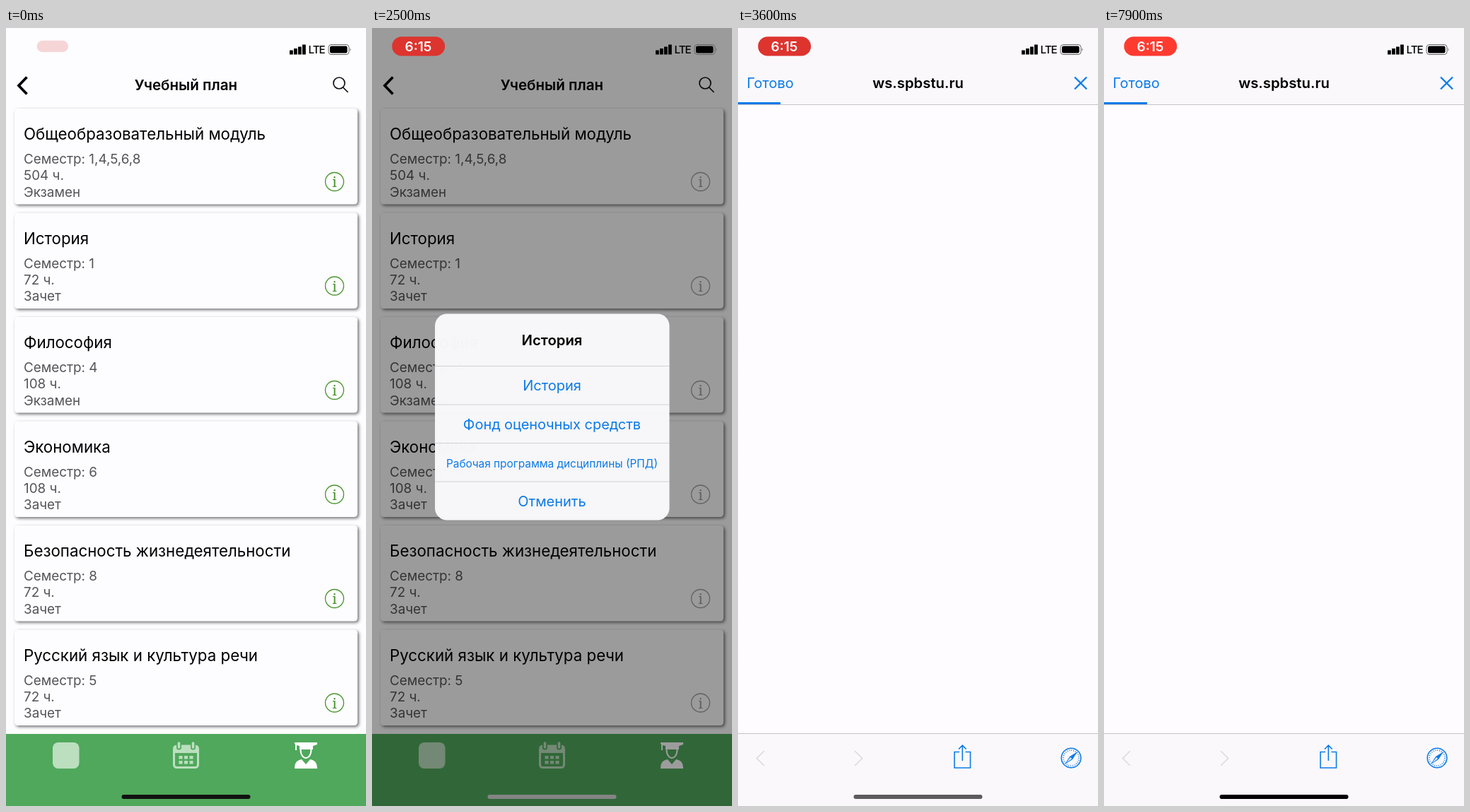
Write an HTML page that moves like this. It is 509 px wide and 1101 px high and loops after 8000 ms.

```html
<!DOCTYPE html>
<html lang="ru">
<head>
<meta charset="utf-8">
<style>
  html, body { margin: 0; width: 100%; height: 100%; overflow: hidden; background: #fdfcfe; }
  svg { display: block; width: 509px; height: 1101px; font-family: Inter, sans-serif; }
  .title { font-size: 22.3px; }
  .sub { font-size: 18.85px; fill: #555456; }
  .bold { font-size: 20.3px; font-weight: 600; }
  .btn { font-size: 20px; }
  .mid { text-anchor: middle; }
  .blue { fill: #0c7ae8; }
  .line { fill: none; stroke: #0c7ae8; stroke-width: 1.6; }
  .card { fill: #fdfcfe; filter: drop-shadow(2px 2px 2px rgba(0, 0, 0, .55)); }
</style>
</head>
<body>
<svg viewBox="0 0 509 1101">
  <g id="list">
    <rect width="800" height="1101" fill="#fdfcfe"/>
    <path d="M29.500 69.500L18 81.500L29.500 93.500" fill="none" stroke="#000" stroke-width="3.700"/>
    <text class="bold mid" x="254.500" y="88" style="font-size:20.6px">Учебный план</text>
    <g fill="none" stroke="#111" stroke-width="1.700"><circle cx="471" cy="78" r="8"/><path d="M476.500 84L483.500 91"/></g>
    <g id="cards"></g>
    <rect id="highlight" y="256" width="509" height="147" fill="#d9d8da"/>
    <g id="rows"></g>
    <rect y="999" width="800" height="102" fill="#50a85c"/>
    <rect x="66" y="1011" width="37.500" height="37" rx="8" fill="#bbdfbf"/>
    <g id="calendar" fill="#bbdfbf">
      <rect x="237.500" y="1016" width="34" height="30.500" rx="4" fill="none" stroke="#bbdfbf" stroke-width="3"/>
      <path d="M237 1016h35v10h-35z"/>
      <path d="M244.500 1012v6M264.500 1012v6" stroke="#50a85c" stroke-width="7" stroke-linecap="round"/>
      <path d="M244.500 1012v6M264.500 1012v6" stroke="#bbdfbf" stroke-width="3.600" stroke-linecap="round"/>
    </g>
    <g fill="#fff">
      <path d="M408 1011h32v3l-6 2v5h-19v-5l-4-1v7h-2v-8l-1-1z"/>
      <path d="M416.500 1021c0 8 4 12 7.500 12s7.500-4 7.500-12" fill="none" stroke="#fff" stroke-width="2"/>
      <path d="M408 1048c0-9 4-12 10-13l6 7 6-7c6 1 10 4 10 13z"/>
    </g>
  </g>
  <rect id="dim" width="509" height="1101"/>
  <g id="alert">
    <rect id="panel" x="89" y="404.500" width="331.500" height="292" rx="17" fill="#f9f8fa" fill-opacity=".98"/>
    <g id="options" class="mid">
      <path d="M89 478.500h331M89 533h331M89 587.500h331M89 642h331" stroke="#d2d0d4"/>
      <text class="bold" x="254.500" y="448.500">История</text>
      <g class="btn blue">
        <text x="254.500" y="513">История</text>
        <text x="254.500" y="568">Фонд оценочных средств</text>
        <text x="254.500" y="621.500" font-size="15.400">Рабочая программа дисциплины (РПД)</text>
        <text x="254.500" y="677">Отменить</text>
      </g>
    </g>
  </g>
  <g id="browser">
    <rect width="509" height="1101" fill="#fefcff"/>
    <path d="M0 0h509v108H0zM0 998h509v103H0z" fill="#faf8fb"/>
    <path d="M0 108.500h509M0 998.500h509" stroke="#c6c4c8"/>
    <rect id="progress" y="105" height="3" class="blue"/>
    <text class="btn blue" x="12.500" y="85">Готово</text>
    <text class="bold mid" x="254.500" y="84.500">ws.spbstu.ru</text>
    <path class="line" style="stroke-width:2.300" d="M476 69.500l17 17M493 69.500l-17 17"/>
    <path id="arrows" class="line" d="M37 1023L26.500 1033.500L37 1044M165 1023L175.500 1033.500L165 1044"/>
    <path class="line" d="M313 1024.500h-7v22.500h22.500v-22.500h-7M317.300 1037v-21.500M312 1020.500l5.300-5.300l5.300 5.300"/>
    <g class="line">
      <circle cx="471" cy="1033" r="13.800"/>
      <circle cx="471" cy="1033" r="11" stroke-width="2" stroke-dasharray=".8 2.080"/>
      <path class="blue" stroke="none" d="M480 1024l-7 11l-11 7l7-11z"/>
      <path d="M472 1034l-7.500 5.500l5.500-7.500z" fill="#faf8fb" stroke="none"/>
    </g>
  </g>
  <g id="status">
    <path d="M401 31.500h4.800v6H401zM407 29h4.800v8.500H407zM413 26.500h4.800v11H413zM419 23.500h4.800v14H419z"/>
    <text x="427.500" y="36" font-size="15.200" font-weight="500" letter-spacing="-1">LTE</text>
    <rect x="456" y="23.500" width="29" height="14" rx="4" fill="none" stroke="#666"/>
    <rect x="458" y="25.500" width="24.500" height="10" rx="2.200"/>
    <path d="M486.500 28.500q2 2 0 4z" fill="#666"/>
    <g id="pill">
      <rect x="28.300" y="12.200" width="74.800" height="27.300" rx="13.600"/>
      <text id="clock" class="mid" x="65.500" y="33" font-size="19" font-weight="600" fill="#fff">6:15</text>
    </g>
    <rect id="home" x="163.500" y="1085" width="182" height="6" rx="3"/>
  </g>
</svg>
<script>
const $ = id => document.getElementById(id);
const courses = [
  ['Общеобразовательный модуль', '1,4,5,6,8', 504, 'Экзамен'],
  ['История', '1', 72, 'Зачет'],
  ['Философия', '4', 108, 'Экзамен'],
  ['Экономика', '6', 108, 'Зачет'],
  ['Безопасность жизнедеятельности', '8', 72, 'Зачет'],
  ['Русский язык и культура речи', '5', 72, 'Зачет'],
];
courses.forEach(([name, terms, hours, exam], i) => {
  const y = 114 + i * 147.5;
  $('cards').innerHTML += `<rect class="card" x="12" y="${y}" width="485" height="135.500" rx="4.500"/>`;
  $('rows').innerHTML += `
    <g class="row" transform="translate(25 ${y})">
      <text class="title" y="44">${name}</text>
      <text class="sub" y="78">Семестр: ${terms}</text>
      <text class="sub" y="101">${hours} ч.</text>
      <text class="sub" y="124.500">${exam}</text>
    </g>
    <g transform="translate(464.5 ${y + 103.5})">
      <circle r="13" fill="none" stroke="currentColor" stroke-width="1.300"/>
      <text class="mid" y="7.500" font-size="20.500" font-weight="500" font-family="Noto Serif, serif" fill="currentColor">i</text>
    </g>`;
});
for (let i = 0; i < 6; i++)
  $('calendar').innerHTML += `<rect x="${244.5 + i % 3 * 7.5}" y="${1030 + (i > 2) * 7}" width="5" height="4.500"/>`;

const historyRow = document.querySelectorAll('.row')[1];
const LOOP = 8000;
const ramp = (t, from, to) => Math.min(1, Math.max(0, (t - from) / (to - from)));
const ease = (t, from, to) => (1 - Math.cos(Math.PI * ramp(t, from, to))) / 2;
const spring = (t, from) => {
  const x = Math.max(0, t - from) * .01826; // critically damped
  return 1 - (1 + x) * Math.exp(-x);
};
const mix = (a, b, p) => `rgb(${a.map((v, i) => v + (b[i] - v) * p)})`;
const set = (id, attrs) => { for (const k in attrs) $(id).setAttribute(k, attrs[k]); };

// Piecewise-linear grey level of the home indicator: [ms, level]
const homeKeys = [[0, 18], [1000, 32], [1500, 132], [2500, 132], [2700, 98], [3100, 95], [4700, 85], [6300, 0], [LOOP, 0]];
function homeLevel(t) {
  const i = homeKeys.findIndex(([ms]) => ms > t);
  const [a, va] = homeKeys[i - 1], [b, vb] = homeKeys[i];
  return va + (vb - va) * ramp(t, a, b);
}

function draw(t) {
  const shown = spring(t, 940), left = 1 - ease(t, 2500, 2730);
  const alert = shown * left, push = spring(t, 2920);
  const selected = t < 1000 ? 0 : 1 - ease(t, 1050, 1400);

  set('highlight', { opacity: selected });
  historyRow.style.filter = selected ? `drop-shadow(3px 3px 2px rgba(0,0,0,${.4 * selected}))` : '';
  $('rows').style.color = mix([72, 150, 46], [160, 158, 160], ramp(alert, .3, 1));
  set('list', { transform: `translate(${-127 * push} 0)` });
  set('dim', { opacity: .39 * alert + .24 * push });

  const zoom = 1.2 - .2 * shown;
  set('alert', { transform: `translate(254.5 550.5) scale(${zoom}) translate(-254.5 -550.5)` });
  set('panel', { opacity: (1 - (1 - shown) ** 2) * left }); // backdrop appears ahead of its text
  set('options', { opacity: alert });

  const settled = ease(t, 3300, 3600);
  set('browser', { transform: `translate(${509 * (1 - push)} 0)`, visibility: t < 2920 ? 'hidden' : 'visible' });
  set('progress', { width: 2 + 59 * ease(t, 3060, 3650) });
  $('arrows').style.stroke = mix([165, 205, 238], [220, 219, 223], settled);

  const grow = ease(t, -110, 280);
  set('pill', {
    opacity: grow,
    fill: mix([221, 52, 46], [255, 59, 48], ease(t, 5000, 7700)),
    transform: `translate(66 26) scale(${.5 + .5 * grow}) translate(-66 -26)`,
  });
  set('clock', { opacity: ramp(t, 80, 300) });
  const level = homeLevel(t);
  set('home', { fill: `rgb(${level},${level},${level})` });
}

function tick() {
  draw(performance.now() % LOOP);
  requestAnimationFrame(tick);
}
tick();
</script>
</body>
</html>
```
